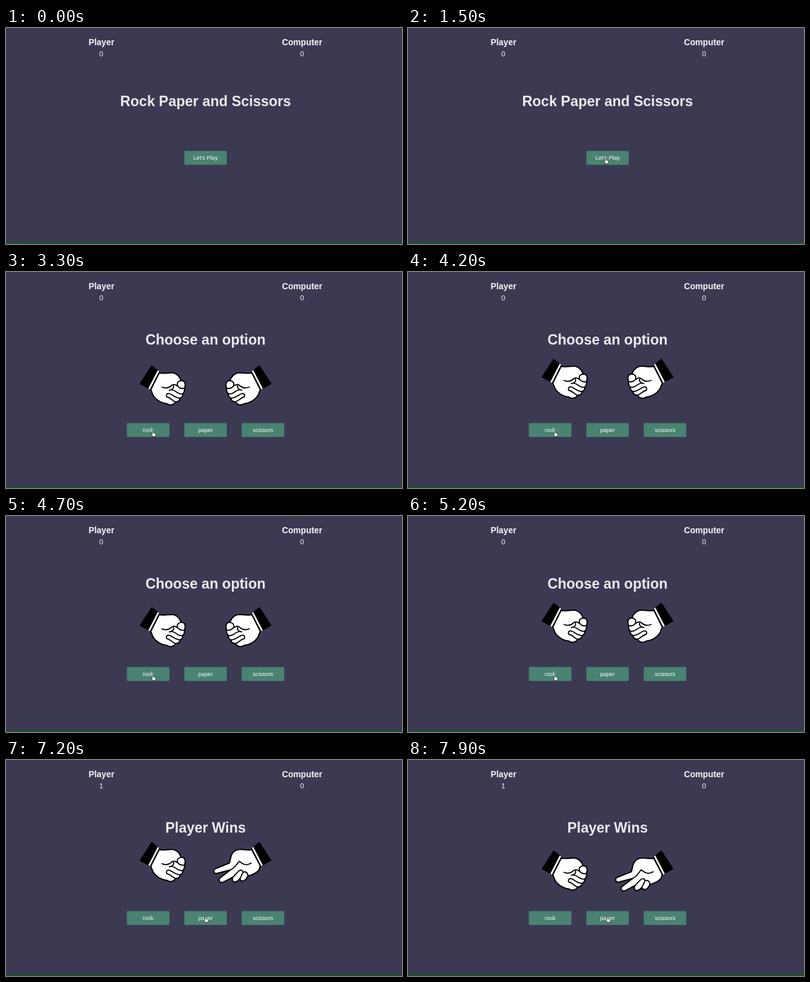
An HTML page that plays this animation: 640x351 px, repeating every 8 s.

```html
<!DOCTYPE html>
<html lang="en">
<head>
<meta charset="utf-8">
<title>Rock Paper and Scissors</title>
<style>
  html, body { margin: 0; width: 100%; height: 100%; overflow: hidden; background: #3c3a53; }
  svg { display: block; width: 100vw; height: 100vh; }
  text { font-family: "Liberation Sans", Arial, sans-serif; text-anchor: middle; fill: #ebebee; }
  .title { font-size: 23px; font-weight: bold; }
  .name { font-size: 13.8px; font-weight: bold; fill: #f6f6f8; }
  .score { font-size: 11.5px; fill: #f6f6f8; }
  .label { font-size: 9.2px; fill: #fff; }
  .button { fill: #4a8371; }
  .skin { fill: #fff; stroke: #000; stroke-width: 2; stroke-linejoin: round; }
  .crease { fill: none; stroke: #000; stroke-width: 1.8; stroke-linecap: round; stroke-linejoin: round; }
  .pointer { fill: #fff; stroke: #000; stroke-width: .6; stroke-linejoin: round; }
  .arrow { fill: #000; stroke: #fff; stroke-width: .7; stroke-linejoin: round; }
</style>
</head>
<body>
<svg viewBox="0 0 640 351" preserveAspectRatio="none">
  <defs>
    <g id="cuff">
      <path d="M246 161L231.500 190" stroke="#000" stroke-width="7"/>
      <path d="M246.200 160.500L231.200 190" stroke="#fff" stroke-width="3"/>
      <path d="M235.500 152.500L244.500 159.500L229.500 188.500L216.800 181.500Z" stroke="#000" stroke-width="1.500" stroke-linejoin="round"/>
    </g>
    <g id="fist">
      <path class="skin" d="M247.500 164C256 166 263 163 271 164C277 166 281 170 283 176.500
        C289 176 291 182 288.500 189C289 193 288 196 285.500 198C286 202 284 204 281.500 205
        C281 209 278 211 274 211C271 217 264 217 260 214C251 213 243 208 238 201L234 191Z"/>
      <path class="crease" d="M283 176.500C278.500 177 276 180 277 184C278 188 283 190 288 189
        M252 187C259 190 264 188 268 184C271 182 274 183 276.500 185
        M270.500 184C272 189 269 191 264 192C268 190 273 193 277 196C280 198 283 198.500 285.500 198
        M260 203C258 199 261 196 265 198C270 200 274 205 281 205
        M260 203C266 204 268 209 274 211"/>
      <use href="#cuff"/>
    </g>
    <g id="scissors">
      <path class="skin" d="M397 164C391 166 384 163 376 164C370 165 366 168 364 174L361 186
        L338.500 195C334 197 335 203.500 340 203L363 197L345.500 210.500
        C342 214.500 347 219 351 217L367 208.500C364 213 366.500 217.500 371 216.500
        C374 216 376 214 378 211.500C379 216 384 216 387 213C390 210 390 208 391 207
        C398 205 405 202 409 197L411 190Z"/>
      <path class="crease" d="M396 186C392 189 386 190 381 186L377 183C373 187 371 193 363 197
        M367 208.500L375 200C378 196 383 197 383 201L378 211.500
        M383 201C387 199 391 201 391 207"/>
      <use href="#cuff" transform="matrix(-1 0 0 1 645 0)"/>
    </g>
  </defs>

  <rect width="640" height="351" fill="#3c3a53"/>
  <rect y="349.600" width="640" height="1.400" fill="#006a00"/>

  <text class="name" x="154.300" y="27.700">Player</text>
  <text class="score" x="154" y="46.200" id="score"></text>
  <text class="name" x="478.500" y="27.700">Computer</text>
  <text class="score" x="478.500" y="46.200">0</text>

  <g id="intro">
    <text class="title" x="322.500" y="127">Rock Paper and Scissors</text>
    <rect class="button" x="288.200" y="199.700" width="68.600" height="22.600" rx="1"/>
    <text class="label" x="322.500" y="214.400">Let's Play</text>
  </g>

  <g id="match">
    <text class="title" x="322.500" y="118" id="message"></text>
    <g id="hands">
      <use href="#fist"/>
      <use href="#fist" id="rival" transform="matrix(-1 0 0 1 645 0)"/>
      <use href="#scissors" id="reveal"/>
    </g>
    <g id="options"></g>
  </g>

  <g id="cursor">
    <path id="pointer" class="pointer" d="M-2 -4Q-1 -5.200 -.2 -4V-1.500L2.600 -.8Q3.800 -.4 3.500 1L2.800 4.300H-1L-3.400 .8Q-3.400 -.6 -2 .2Z"/>
    <path id="arrow" class="arrow" d="M-3 -5V3.500L-1 1.800L.4 4.800L1.700 4.200L.4 1.300H3Z"/>
  </g>
</svg>
<script>
const LOOP = 8000, STEP = 100;
const INTRO_OUT = 1780, MATCH_IN = 2318, FADE = 500;
const SHAKES = [3838, 7050], SHAKE_TIME = 2000, LIFT = 23;
const RESULT = SHAKES[0] + SHAKE_TIME;
const SHAKE_STOPS = [0, .15, .25, .35, .5, .65, .75, .85, 1];

// time, x, y
const CURSOR = [
  [300, 324, 310], [400, 323, 304], [800, 323, 304], [1500, 320.5, 216],
  [2900, 320.5, 216], [3300, 238.5, 263], [6300, 238.5, 263], [6900, 323.5, 259.5]
];

const $ = id => document.getElementById(id);
const clamp = v => Math.min(1, Math.max(0, v));
const show = (id, on) => $(id).setAttribute("display", on ? "inline" : "none");

$("options").innerHTML = ["rock", "paper", "scissors"].map((word, i) => {
  const x = 229.7 + 92.8 * i;
  return `<rect class="button" x="${x - 34.3}" y="245.5" width="68.6" height="22.6" rx="1"/>
    <text class="label" x="${x}" y="260">${word}</text>`;
}).join("");

// CSS "ease": cubic-bezier(.25, .1, .25, 1)
function ease(p) {
  p = clamp(p);
  const bezier = (u, a, b) => 3 * u * (1 - u) ** 2 * a + 3 * u * u * (1 - u) * b + u ** 3;
  let lo = 0, hi = 1;
  for (let i = 0; i < 24; i++) {
    const mid = (lo + hi) / 2;
    if (bezier(mid, .25, .25) < p) lo = mid; else hi = mid;
  }
  return bezier(lo, .1, 1);
}

// Four hops; odd stops are the peaks.
function shake(p) {
  if (p <= 0 || p >= 1) return 0;
  const i = SHAKE_STOPS.findIndex(s => s > p);
  const from = SHAKE_STOPS[i - 1];
  const k = ease((p - from) / (SHAKE_STOPS[i] - from));
  return -LIFT * (i % 2 ? k : 1 - k);
}

function cursorAt(t) {
  const i = CURSOR.findIndex(c => c[0] > t);
  if (i < 0) return CURSOR[CURSOR.length - 1].slice(1);
  const [a, b] = [CURSOR[Math.max(0, i - 1)], CURSOR[i]];
  const p = clamp((t - a[0]) / (b[0] - a[0] || 1));
  const k = p * p * (3 - 2 * p);
  return [a[1] + (b[1] - a[1]) * k, a[2] + (b[2] - a[2]) * k];
}

function overButton(x, y) {
  const inColumn = c => Math.abs(x - c) < 34.5;
  return y > 202 && y < 226 && inColumn(322.5) ||
    y > 249 && y < 272 && [229.7, 322.5, 415.3].some(inColumn);
}

function draw(t) {
  const done = t >= RESULT;
  $("intro").setAttribute("opacity", 1 - ease((t - INTRO_OUT) / FADE));
  $("match").setAttribute("opacity", ease((t - MATCH_IN) / FADE));
  $("score").textContent = done ? 1 : 0;
  $("message").textContent = done ? "Player Wins" : "Choose an option";
  show("rival", !done);
  show("reveal", done);

  const lift = SHAKES.reduce((sum, s) => sum + shake((t - s) / SHAKE_TIME), 0);
  $("hands").setAttribute("transform", `translate(0 ${lift})`);

  const [x, y] = cursorAt(t), over = overButton(x, y);
  show("cursor", t >= CURSOR[0][0]);
  show("pointer", over);
  show("arrow", !over);
  $("cursor").setAttribute("transform", `translate(${x} ${y})`);
}

const start = performance.now();
function tick() {
  const t = (performance.now() - start) % LOOP;
  draw(Math.floor(t / STEP) * STEP);
  requestAnimationFrame(tick);
}
tick();
</script>
</body>
</html>
```
